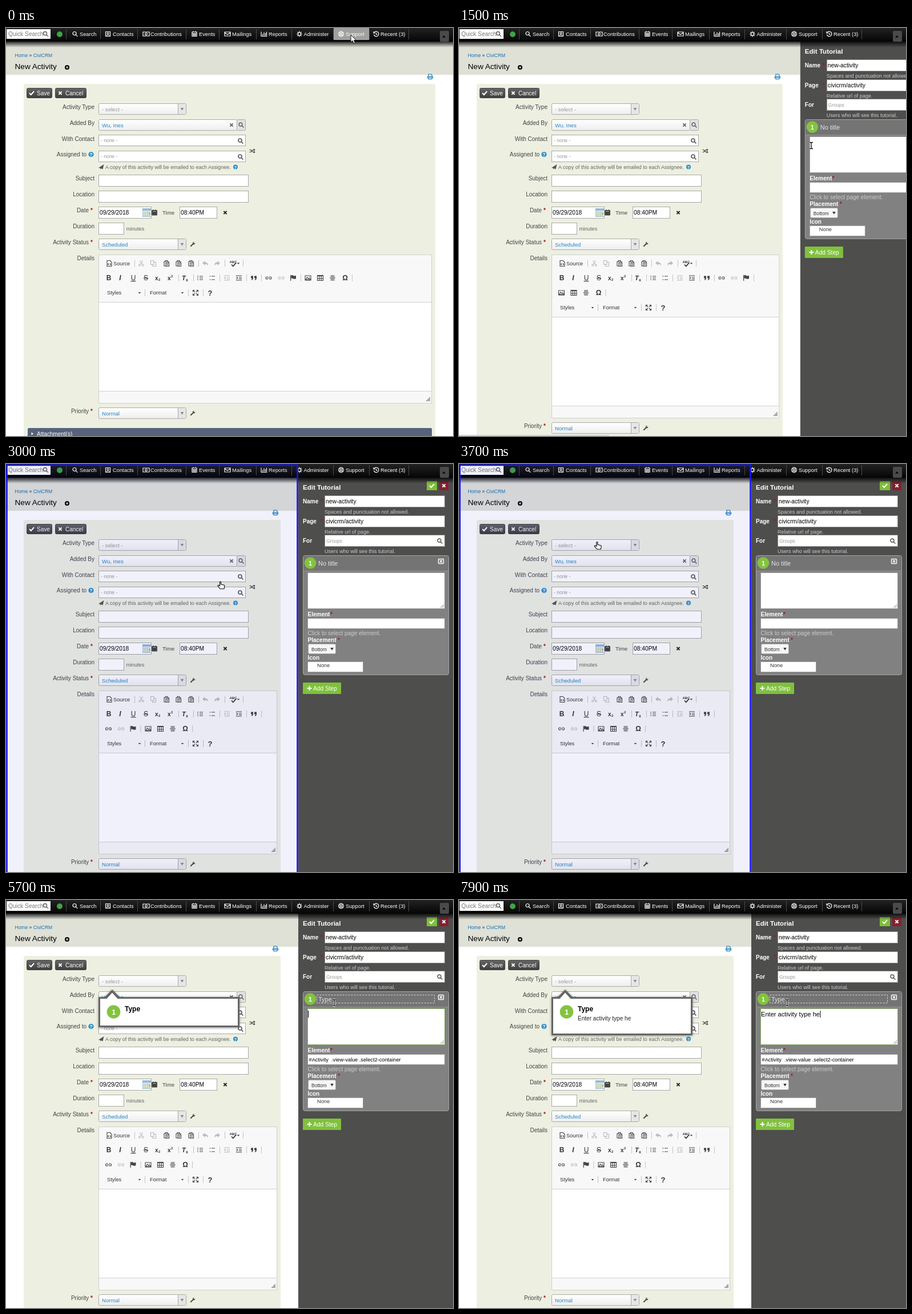
Animation, 783 px wide and 715 px high, one loop 8000 ms. Source, as an HTML page:

```html
<!DOCTYPE html>
<html lang="en">
<head>
<meta charset="utf-8">
<title>Tutorial editor</title>
<style>
html, body { margin: 0; width: 100%; height: 100%; overflow: hidden; background: #fff; }
svg { display: block; width: 783px; height: 715px; }
text { font-family: "Liberation Sans", Arial, sans-serif; white-space: pre; }
</style>
</head>
<body>
<svg viewBox="0 0 783 715">
  <defs>
    <linearGradient id="sel" x2="0" y2="1"><stop offset="0" stop-color="#fff"/><stop offset="1" stop-color="#eee"/></linearGradient>
    <linearGradient id="bar" x2="0" y2="1"><stop offset="0" stop-color="#222"/><stop offset="1" stop-color="#050505"/></linearGradient>
    <linearGradient id="shade" x2="0" y2="1"><stop offset="0" stop-opacity=".8"/><stop offset="1" stop-opacity="0"/></linearGradient>
    <linearGradient id="btn" x2="0" y2="1"><stop offset="0" stop-color="#666"/><stop offset="1" stop-color="#3e3e3e"/></linearGradient>
    <filter id="soft" x="-10%" y="-20%" width="120%" height="150%"><feDropShadow dx="0" dy="1" stdDeviation="2" flood-opacity=".45"/></filter>
  </defs>
  <g id="page"></g>
  <g id="panel"></g>
  <g id="nav"></g>
  <g id="over"></g>
  <g id="cursor"></g>
</svg>
<script>
const LOOP = 8000, STEP = 100, WIDTH = 783, PANEL = 271;
const BLUE = '#2786c2', GREEN = '#83c33f';

// Icon outlines around 0,0; a leading "!" means filled.
const ICONS = {
  search: 'M2-1a3 3 0 1 1-6 0a3 3 0 1 1 6 0M1.2 1.2L4.4 4.4',
  book: 'M-4-4H4V4H-4ZM-1.5-1a1.5 1.5 0 1 1 3 0a1.5 1.5 0 1 1-3 0M-2.5 3Q0 0 2.5 3',
  money: 'M-5.5-3.5H5.5V3.5H-5.5ZM-1.8 0a1.8 2 0 1 1 3.6 0a1.8 2 0 1 1-3.6 0',
  calendar: 'M-4-3.5H4V4H-4ZM-4-1H4M-4 1.5H4M-1.3-1V4M1.3-1V4M-2-5V-3M2-5V-3',
  mail: 'M-5-3.5H5V3.5H-5ZM-5-2.5L0 1L5-2.5',
  chart: 'M-5-4V4H5.5M-2.5 3V0M0 3V-3M2.5 3V-1.5M4.5 3V-4',
  gear: 'M-2.6 0a2.6 2.6 0 1 1 5.2 0a2.6 2.6 0 1 1-5.2 0M0-5V-3M0 3V5M-5 0H-3M3 0H5M-3.5-3.5L-2-2M2 2L3.5 3.5M-3.5 3.5L-2 2M2-2L3.5-3.5',
  ring: 'M-4.3 0a4.3 4.3 0 1 1 8.6 0a4.3 4.3 0 1 1-8.6 0M-1.8 0a1.8 1.8 0 1 1 3.6 0a1.8 1.8 0 1 1-3.6 0M-3-3L-1.3-1.3M3 3L1.3 1.3M-3 3L-1.3 1.3M3-3L1.3-1.3',
  clock: 'M-3.5-2.5a4.3 4.3 0 1 1-.6 3.5M-4.5-4.5V-1.5H-1.5M0-2V.7H2',
  check: 'M-4 0L-1.2 3L4-3',
  times: 'M-2.6-2.6L2.6 2.6M2.6-2.6L-2.6 2.6',
  plus: 'M-4 0H4M0-4V4',
  print: 'M-3 0V-4H2L3-3V0M-4.5 3V0H4.5V3M-3 1.5H3V4.3H-3Z',
  shuffle: 'M-4.5-2H-2.5L1.5 2H4M-4.5 2H-2.5L1.5-2H4M3-3.5L4.7-2L3-.5M3 .5L4.7 2L3 3.5',
  plane: '!M-5 1.5L4.5-4.5L2.5 4L-.5 2.5L-2 4.5V2Z',
  wrench: '!M-4.3 3L0-1.2Q-.3-4 2.7-4.2L1.5-2.5L2.5-1.4L4.3-2.5Q4.3.8 1.2.3L-3 4.5Z',
  down: '!M-2.8-2H2.8L0 2.6Z',
  small: '!M-2.4-1H2.4L0 1.6Z',
  right: '!M-1.5-2.6L2-0L-1.5 2.6Z',
  map: '!M-4.5-3.5L-2-4.5L1-3.5L4.5-4.5V3.5L1 4.5L-2 3.5L-4.5 4.5Z',
  doc: 'M-4-5H1L4-2V5H-4ZM-1 0L-2.5 1.5L-1 3M1 0L2.5 1.5L1 3',
  cut: 'M-2.5-5L2 2M2.5-5L-2 2M-4.3 3a1.5 1.5 0 1 1 3 0a1.5 1.5 0 1 1-3 0M1.3 3a1.5 1.5 0 1 1 3 0a1.5 1.5 0 1 1-3 0',
  copy: 'M-4.5-5H1V2H-4.5ZM1-2H4.5V5H-1.5V2',
  paste: 'M-1-3H-4V4.5H-1M-2-5H2V-3H-2ZM2-3H4V-1M-1-1H4.5V5H-1ZM.5 1H3M.5 3H3',
  undo: '!M-5-.5L-.5-4.5V-2Q5-2 5 4Q3 1-.5 1V3.5Z',
  redo: '!M5-.5L.5-4.5V-2Q-5-2-5 4Q-3 1 .5 1V3.5Z',
  ol: 'M-1-3H5M-1 0H5M-1 3H5M-4-4V-2M-5 3H-3M-5 0H-3',
  ul: 'M-1-3H5M-1 3H5M-4.5-3H-2.5M-4.5 3H-2.5',
  outdent: 'M-5-4H5M0-1H5M0 1.5H5M-5 4H5M-2-2L-4.5 0L-2 2',
  indent: 'M-5-4H5M0-1H5M0 1.5H5M-5 4H5M-4.5-2L-2 0L-4.5 2',
  quote: '!M-5-3.5H-1V0Q-1 3-4 4V2.5Q-3 2-3 .5H-5ZM1-3.5H5V0Q5 3 2 4V2.5Q3 2 3 .5H1Z',
  link: 'M-1-2H-3Q-5-2-5 0T-3 2H-1M1-2H3Q5-2 5 0T3 2H1M-2.5 0H2.5',
  flag: '!M-5-5H-3.8V5H-5ZM-3.5-4.5Q-1.5-5.5 0-4.2T5-4.2V1.2Q2.5 2.5 0 1.2T-3.5 1.2Z',
  image: 'M-5-4H5V4H-5ZM-4 3L-1.5-1L1 1.5L2.5 0L4.5 3ZM2-2H3',
  table: 'M-5-4.5H5V4.5H-5ZM-5-3.5H5M-5 1H5M-1.7-3V4M1.7-3V4',
  hr: 'M-5 0H5M-3.5-4H3.5M-3.5-2H3.5M-3.5 2H3.5M-3.5 4H3.5',
  max: 'M-4.5-1.5V-4.5H-1.5M4.5-1.5V-4.5H1.5M-4.5 1.5V4.5H-1.5M4.5 1.5V4.5H1.5M-4-4L-1-1M4-4L1-1M-4 4L-1 1M4 4L1 1'
};

const rect = (x, y, w, h, fill, line = 'none', r = 0, more = '') =>
  `<rect x="${x}" y="${y}" width="${Math.max(0, w)}" height="${h}" fill="${fill}" stroke="${line}" rx="${r}" ${more}/>`;
const box = (x, y, w, h, fill = '#fff', line = '#a9a9a9', r = 0) => rect(x + .5, y + .5, w - 1, h - 1, fill, line, r);
const text = (s, x, y, size = 10, fill = '#444', more = '') =>
  `<text x="${x}" y="${y}" font-size="${size}" fill="${fill}" ${more}>${s}</text>`;
const bold = (s, x, y, size, fill, more = '') => text(s, x, y, size, fill, 'font-weight="bold" ' + more);
const path = (d, line, w = 1, more = '') => `<path d="${d}" fill="none" stroke="${line}" stroke-width="${w}" ${more}/>`;
const dot = (x, y, r, fill) => `<circle cx="${x}" cy="${y}" r="${r}" fill="${fill}"/>`;
const at = (x, y, s) => `<g transform="translate(${x} ${y})">${s}</g>`;
function icon(name, x, y, color = '#444', w = 1.2) {
  const d = ICONS[name];
  return at(x, y, d[0] === '!' ? `<path d="${d.slice(1)}" fill="${color}"/>` : path(d, color, w));
}
const middle = 'text-anchor="middle"', end = 'text-anchor="end"';
const star = (x, y) => bold('*', x, y, 10, '#a01818');
const label = (s, y, req) => text(s, req ? 145 : 155, y, 10, '#444', end) + (req ? star(148, y) : '');
const help = (x, y, r) => dot(x, y, r, '#2f8fc6') + bold('?', x, y + 3, r * 1.8, '#fff', middle);

function select(y, value, color = BLUE) {
  return box(162, y, 154, 20, 'url(#sel)', '#aaa', 2) + rect(302, y + 1, 13, 18, '#e6e6e6') +
    path(`M301.5 ${y + 1}v18`, '#aaa') + icon('down', 308.5, y + 10, '#888') + text(value, 168, y + 13.5, 9.6, color);
}
const lookup = y => box(162, y, 258, 20) + text('- none -', 166, y + 13, 8.5, '#999') + icon('search', 411, y + 11, '#555', 1.6);
const button = (x, w, name, s, tx) => box(x, 105, w, 18, 'url(#btn)', '#444', 2) +
  icon(name, x + 9, 114, '#fff', 2) + text(s, tx, 117.5, 10, '#fff');

const sep = (x, y) => path(`M${x + .5} ${y - 6}v12`, '#c4c4c4');
const tools = (y, list) => list.map(([n, x, dim]) =>
  n === '|' ? sep(x, y) : icon(n, x, y, dim ? '#bbb' : '#444', 1.1)).join('');
const glyph = (s, x, y, more = '') => text(s, x, y + 4, 12, '#333', middle + ' ' + more);

function editor(W) {
  const right = W - 37, wrapInsert = right < 612, wrapLink = right < 522;
  const extra = wrapInsert ? 26 : 0, row = 438, last = 464 + extra, top = 481 + extra, foot = 637 + extra;
  const insert = tools(0, [['image', 529], ['table', 550.5], ['hr', 572], ['|', 606]]) + glyph('Ω', 594, 0, 'font-weight="bold"');
  const links = tools(0, [['link', 460], ['link', 482, 1], ['flag', 503], ['|', 516]]);
  return box(162, 397, right - 162, 261 + extra, '#fff', '#d1d1d1') +
    rect(163, 398, right - 164, top - 398, '#f8f8f8') + rect(163, foot, right - 164, 20, '#f8f8f8') +
    path(`M163 ${top - .5}H${right - 1}M163 ${foot - .5}H${right - 1}`, '#d1d1d1') +
    `<path d="M${right - 3} ${foot + 9}v8h-8z" fill="#aaa"/>` +
    tools(412.5, [['doc', 181], ['|', 225], ['cut', 237, 1], ['copy', 258, 1], ['paste', 281], ['paste', 302], ['paste', 324],
      ['|', 337], ['undo', 349, 1], ['redo', 370, 1], ['|', 383], ['small', 407], ['|', 415]]) +
    text('Source', 188, 416, 9.24, '#333') + bold('ABC', 398, 412, 6, '#333', middle) + icon('check', 399, 414.5, '#333', 1.8) +
    glyph('B', 180, row, 'font-weight="bold"') + glyph('I', 200, row, 'font-style="italic" font-weight="bold"') +
    glyph('U', 223, row, 'text-decoration="underline"') + glyph('S', 245, row, 'text-decoration="line-through"') +
    bold('x', 261, 441.5, 10, '#333') + bold('2', 267, 443, 6, '#333') +
    bold('x', 283, 441.5, 10, '#333') + bold('2', 289, 437, 6, '#333') +
    bold('T', 308, 442, 11, '#333', 'font-style="italic"') + bold('x', 315, 444, 7, '#333') +
    tools(row, [['|', 302], ['|', 328], ['ol', 340], ['ul', 361], ['|', 374], ['outdent', 387, 1], ['indent', 408],
      ['|', 421], ['quote', 434], ['|', 447]]) +
    at(wrapLink ? -280.5 : 0, wrapLink ? 464 : row, links) +
    at(wrapLink ? -280 : wrapInsert ? -349.5 : 0, wrapInsert ? 464 : row, insert) +
    text('Styles', 177, last + 3, 9.24, '#333') + text('Format', 252, last + 3, 9.24, '#333') +
    tools(last, [['small', 234], ['|', 243], ['small', 309], ['|', 319], ['max', 332], ['|', 345]]) +
    bold('?', 357.5, last + 4.5, 13, '#333', middle) +
    label('Priority', 675 + extra, 1) + select(665 + extra, 'Normal') + icon('wrench', 327, 675 + extra) +
    rect(38, 701 + extra, W - 75, 20, '#56637a', 'none', 2) + icon('right', 46, 711 + extra, '#fff') +
    text('Attachment(s)', 54, 714.5 + extra, 10, '#fff');
}

function page(W) {
  return rect(0, 0, WIDTH, 715, '#fff') + rect(0, 0, W, 82, '#dfe1d7') +
    text(`Home <tspan fill="#333">»</tspan> CiviCRM`, 15.5, 51, 8.5, '#1d72b0') +
    text('New Activity', 15.5, 71.5, 13.6, '#000') + dot(107, 69, 4, '#000') + path('M104.8 69h4.4M107 66.8v4.4', '#fff', 1.1) +
    icon('print', W - 40, 85, '#1d7fbd') +
    rect(31, 98, W - 62, 640, '#edefe1', 'none', 3) +
    button(36, 45, 'check', 'Save', 54) + button(86, 55, 'times', 'Cancel', 104) +
    label('Activity Type', 141.5) + select(132, '- select -', '#999') +
    label('Added By', 169.5) + box(162, 160, 243, 20, 'url(#sel)', '#aaa', 2) + text('Wu, Ines', 168, 173.5, 9.6, BLUE) +
    icon('times', 395, 170, '#666', 1.8) + box(404, 160, 16, 20, '#e2e2e2', '#aaa', 2) + icon('search', 412, 170, '#666', 1.5) +
    label('With Contact', 197.5) + lookup(187) + icon('shuffle', 431, 215.5) +
    text('Assigned to', 141, 225, 10, '#444', end) + help(149, 221.5, 4.6) + lookup(215) +
    icon('plane', 167, 243.5, '#555') + text('A copy of this activity will be emailed to each Assignee.', 174, 247, 9.06, '#666') + help(402, 243.5, 4) +
    label('Subject', 267) + box(162, 257, 263, 21) + label('Location', 295) + box(162, 285, 263, 21) +
    label('Date', 323, 1) + box(162, 313, 93, 21) + text('09/29/2018', 164, 327, 10.26, '#000') +
    box(239, 316, 16, 15, '#e9f1f6', '#9fb9cc') + rect(240, 317, 14, 3, '#8fb8d8') +
    path('M241 322.5h12M241 325.5h12M241 328.5h12', '#a9c08c', 2, 'stroke-dasharray="2 1"') + rect(250, 324, 3, 3, '#eda64a') +
    icon('calendar', 260, 323.5, '#222', 1.5) + text('Time', 274, 326.5, 9.6) +
    box(304, 313, 66, 21) + text('08:40PM', 306, 327, 10.26, '#000') + icon('times', 384, 323.5, '#222', 2) +
    label('Duration', 351) + box(162, 341, 45, 21) + text('minutes', 210.5, 355, 9.06, '#666') +
    label('Activity Status', 379, 1) + select(369, 'Scheduled') + icon('wrench', 327, 379) +
    label('Details', 407) + editor(W);
}

const handle = (x, y) => path(`M${x - 6} ${y}l6-6M${x - 3} ${y}l3-3`, '#888');

function panel(s) {
  const name = (t, x, y) => bold(t, x, y, 10, '#fff');
  const hint = (t, x, y, size = 9.06) => text(t, x, y, size, '#ccc');
  const input = (y, h, v) => box(558, y, 211, h, '#fff', '#888') + text(v, 560, y + 14, 10.26, '#000');
  const caret = x => s.caret ? path(`M${x} 194v12`, '#000') : '';
  return at(s.left - 512, 0,
    rect(512, 0, 280, 715, '#4e4e4d') + bold('Edit Tutorial', 520, 45, 11.55, '#fff') +
    rect(737, 30, 18, 16, s.picked ? '#7fbf3b' : '#5e9a2c') +
    (s.picked ? '' : rect(738.5, 31.5, 15, 13, 'none', '#cfe5b5', 0, 'stroke-dasharray="1 1"')) + icon('check', 746, 38, '#fff', 2) +
    rect(759, 30, 16, 16, '#85202f') + icon('times', 767, 38, '#fff', 2) +
    name('Name', 520, 69) + star(551, 69) + input(55, 21, 'new-activity') + hint('Spaces and punctuation not allowed.', 558, 86.5) +
    name('Page', 520, 104) + star(551, 104) + input(90, 21, 'civicrm/activity') + hint('Relative url of page.', 558, 121.5) +
    name('For', 520, 138) + box(558, 124, 211, 21, '#fff', '#888') + text('Groups', 561, 137.5, 8.5, '#999') + icon('search', 760, 135, '#555', 1.4) +
    hint('Users who will see this tutorial.', 558, 155.5) +
    box(520, 160, 256, 210, '#818181', '#a5a5a5', 3) + rect(521, 161, 254, 26, '#747474', 'none', 2) + path('M521 187.5h254', '#939393') +
    dot(533, 173.5, 10.3, GREEN) + bold('1', 533, 177.5, 11, '#fff', middle) +
    (s.editTitle ? rect(544.5, 166.5, 206, 14, 'none', '#d4d4d4', 0, 'stroke-dasharray="3 2"') : '') +
    text(s.title || (s.editTitle ? '' : 'No title'), 547, 177.5, 11, '#e4e4e4') +
    rect(757.5, 166.5, 9, 8, 'none', '#fff', 1, 'stroke-width="1.4"') + at(762, 170.5, path('M-2-2L2 2M2-2L-2 2', '#fff', 1.4)) +
    box(528, 190, 241, 64, '#fff', s.focus ? '#8db268' : '#999') + handle(767, 252) +
    text(s.body, 529, 204, 11.1, '#000') + (s.focus ? caret(s.body ? 530 + s.bodyWidth : 529.5) : '') +
    name('Element', 528.5, 267) + star(568, 267) + box(528, 270, 241, 19, '#fff', '#999') +
    text(s.element, 530.5, 283, 9.24, '#000') + hint('Click to select page element.', 528.5, 299.5, 10) +
    name('Placement', 528.5, 312) + star(581, 312) + box(529, 315, 49, 18, '#f6f6f6', '#aaa', 2) +
    text('Bottom', 535, 327.5, 8.5, '#333') + icon('down', 571, 324, '#333') +
    name('Icon', 528.5, 343) + box(528, 346, 98, 19, '#fff', '#999') + text('None', 545, 356, 9.24, '#333') +
    rect(520, 383, 67, 20, '#80c13c', 'none', 1) + icon('plus', 531.5, 393, '#fff', 2) + text('Add Step', 538, 396.5, 10.2, '#fff'));
}

const NAV = [['search', 'Search', 121, 129, 165], ['book', 'Contacts', 178.5, 187, 230], ['money', 'Contributions', 245.5, 253, 315],
  ['calendar', 'Events', 330, 338, 373], ['mail', 'Mailings', 388, 396, 438], ['chart', 'Reports', 452, 460, 500],
  ['gear', 'Administer', 514, 521.5, 573], ['ring', 'Support', 587, 595, 636], ['clock', 'Recent (3)', 648.5, 656, 705]];
const MENU = [['Get started', 31], ['Documentation', 51], ['Ask a question', 71.5], ['Get expert help', 91.5], ['About CiviCRM', 112],
  ['Register your site', 136], ['Join CiviCRM', 156], ['Developer', 176.5], ['Create tour of this screen', 205.5]];

function nav(s) {
  let out = rect(0, 24, WIDTH, 10, 'url(#shade)') + rect(0, 0, WIDTH, 24, 'url(#bar)') +
    (s.support ? rect(574, 0, 62, 21, '#a0a09f') : '') +
    rect(1, 2, 77, 17, '#fff') + text('Quick Search', 4, 14, 10.26, '#777') + icon('search', 69.5, 10.5, '#555', 1.3) +
    dot(94, 11, 5, '#42a047') + path('M105.5 2v18', '#4a4a4a');
  for (const [name, t, ix, tx, line] of NAV)
    out += icon(name, ix, 10.5, '#fff') + text(t, tx, 14, 9.3, '#fff') + path(`M${line + .5} 2v18`, '#4a4a4a');
  out += rect(760, 5, 16, 19, '#4a4a4a', 'none', 2) + at(767, 15, '<path d="M-3 1.5H3L0-2Z"/>');
  if (!s.menu) return out;
  out += rect(574.5, 21.5, 147, 194, '#555', '#111', 0, 'filter="url(#soft)"');
  MENU.forEach(([t, y], i) => {
    const wide = i === 8;
    if (Math.abs(s.y + 2 - y) < 10) out += rect(575, y - 9, 146, 18, '#989898');
    out += text(t, wide ? 592.5 : 579.5, y + 3, 9.24, '#fff');
  });
  return out + icon('map', 584, 205, '#fff') + icon('right', 711.5, 176.5, '#fff') + path('M575 125.5h146M575 190.5h146', '#111', 1.2);
}

function overlay(s) {
  let out = s.status ? rect(0, 713, 263, 2, '#d5d5d5') : '';
  if (s.mark) {
    const [x, y, w, h] = s.mark;
    out += rect(x, y, w, h, 'rgba(0,0,200,.055)', '#1414ee', 0, 'stroke-width="2.6"');
  }
  if (s.popup) {
    const bottom = s.body ? 236 : 222;
    out += `<g filter="url(#soft)">` + rect(163.5, 171.5, 244, bottom - 172, '#fff', '#666', 0, 'stroke-width="3"') +
      '<path d="M172 171L186 157L200 171Z" fill="#666"/></g><path d="M176.5 173L186 162.5L195.5 173Z" fill="#fff"/>' +
      dot(188.5, 196, 11.8, GREEN) + bold('1', 188.5, 200.5, 13, '#fff', middle) +
      bold(s.title, 208, 195, 12, '#000') + text(s.body, 208, 211, 10.05, '#222');
  }
  return out;
}

const BEAM = 'M-3-5.5H-1L0-4.5L1-5.5H3M-3 5.5H-1L0 4.5L1 5.5H3M0-5V5';
const CURSORS = {
  arrow: '<path d="M0 0V13L3 10.3L5.2 15L7.5 14L5.4 9.5H9.3Z" fill="#fff" stroke="#111"/>',
  hand: '<path d="M-1 0Q0-1.2 1 0V4L6.5 5.5Q7.5 6 7.3 8L6.5 12H-.5L-4.5 6.8Q-4.5 5-2.5 6L-1 7Z" fill="#fff" stroke="#111" stroke-width="1.2"/>',
  beam: path(BEAM, '#fff', 3) + path(BEAM, '#111', 1.3)
};

// time, x, y, shape until the next stop
const MOVES = [[0, 604, 12, 'arrow'], [300, 605, 14, 'hand'], [900, 615, 203, 'hand'], [1400, 617, 206, 'beam'],
  [1800, 617, 206, 'arrow'], [2100, 571, 320, 'arrow'], [2400, 600, 281, 'beam'], [2600, 540, 262, 'hand'],
  [2800, 420, 230, 'hand'], [3600, 242, 137, 'hand'], [4400, 241, 139, 'hand'], [4600, 300, 150, 'arrow'],
  [4900, 575, 180, 'beam'], [LOOP, 575, 180, 'beam']];

function pointer(t) {
  const i = MOVES.findLastIndex(m => m[0] <= t);
  const [t0, x0, y0, shape] = MOVES[i], [t1, x1, y1] = MOVES[i + 1];
  const k = (t - t0) / (t1 - t0);
  return { x: x0 + (x1 - x0) * k, y: y0 + (y1 - y0) * k, shape };
}

const typed = (s, t, start, pace) => s.slice(0, Math.max(0, Math.floor((t - start) / pace)));
const pen = document.createElement('canvas').getContext('2d');
pen.font = '11.1px "Liberation Sans", Arial, sans-serif';

function state(t) {
  const k = Math.min(1, Math.max(0, (t - 1300) / 500));
  const body = typed('Enter activity type he', t, 5760, 70);
  return {
    ...pointer(t), body, bodyWidth: pen.measureText(body).width,
    left: WIDTH - PANEL * (1 - (1 - k) ** 2.25),
    support: t < 1300, menu: t >= 200 && t < 1300, status: t >= 1300 && t < 1700,
    picked: t >= 2400,
    mark: t < 2700 || t >= 4300 ? null : t < 4000 ? [1.5, 2, 509, 720] : [162, 132, 154, 20],
    popup: t >= 4300, element: t >= 4300 ? '#Activity  .view-value .select2-container' : '',
    editTitle: t >= 4900, title: typed('Type', t, 5000, 120),
    focus: t >= 5600, caret: true
  };
}

const shown = {};
function put(id, html) {
  if (shown[id] !== html) document.getElementById(id).innerHTML = shown[id] = html;
}

function draw(now) {
  const t = Math.floor((now % LOOP) / STEP) * STEP, s = state(t);
  put('page', page(s.left));
  put('panel', s.left < WIDTH ? panel(s) : '');
  put('nav', nav(s));
  put('over', overlay(s));
  put('cursor', at(s.x, s.y, CURSORS[s.shape]));
}

const start = performance.now();
function tick() {
  draw(performance.now() - start);
  requestAnimationFrame(tick);
}
tick();
</script>
</body>
</html>
```
